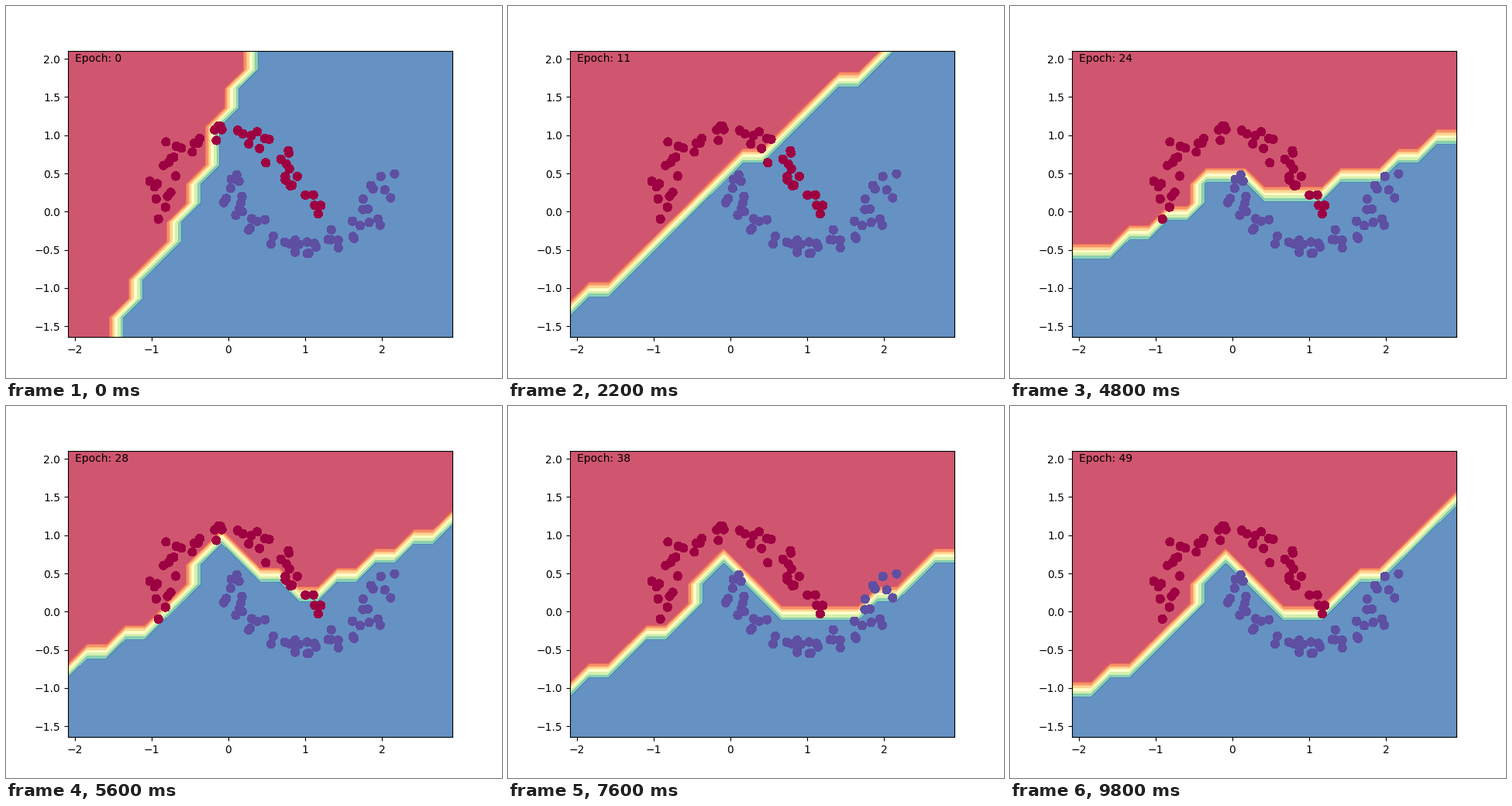
Write a matplotlib script that moves like this. It is 640 by 480 pixels and loops after 10000 ms.

```python
import numpy as np
import matplotlib.pyplot as plt
from matplotlib.animation import FuncAnimation

EPOCHS, STEP_MS = 50, 200
STEP = 0.25
COLS, ROWS = np.arange(21), np.arange(16)
XS, YS = -2.0865 + STEP * COLS, -1.6424 + STEP * ROWS


def make_moons(n=100, noise=0.1, seed=1337):
    """Two interleaved half circles, shuffled and jittered."""
    rng = np.random.RandomState(seed)
    t = np.linspace(0, np.pi, n // 2)
    upper = np.column_stack([np.cos(t), np.sin(t)])
    lower = np.column_stack([1 - np.cos(t), 0.5 - np.sin(t)])
    points = np.vstack([upper, lower])
    classes = np.repeat([0, 1], n // 2)
    order = np.arange(n)
    rng.shuffle(order)
    return points[order] + rng.normal(scale=noise, size=(n, 2)), classes[order]


def curve(*pts):
    """Boundary height, in grid rows, at every grid column."""
    return np.interp(COLS, *zip(*pts))


# The boundary swings down, flattens, then wraps around the lower moon
PEAK = [(7, 9), (8, 10), (11, 7)]
KEYS = {
    0: curve((0, -4.5), (3, 1.7), (7, 9), (20, 41.6)),
    6: curve((0, 0.2), (20, 19)),
    11: curve((0, 2.3), (2, 3.3), (9, 9.6), (20, 18.4)),
    19: curve((0, 5.05), (9, 7.55), (20, 10)),
    28: curve((0, 4.2), (6, 7.6), (7, 10), (8, 11), (10, 9), (13, 8.1),
              (20, 11.9)),
    33: curve((0, 2.6), (6, 6.9), (7, 9), (8, 10.2), (10, 9.2), (12, 9.2),
              (20, 15)),
    38: curve((0, 3.1), (6, 6.9), *PEAK, (15, 7.2), (20, 10.3)),
    49: curve((0, 2.7), (3, 4.4), (6, 7), *PEAK, (13, 7), (16, 9.4),
              (20, 13)),
}
TIMES = list(KEYS)
TRACKS = np.transpose(list(KEYS.values()))


def predict(epoch):
    """Class of each grid node: 1 below the boundary, 0 above it."""
    height = np.array([np.interp(epoch, TIMES, track) for track in TRACKS])
    return (ROWS[:, None] < np.floor(height + 0.5)).astype(float)


fig, ax = plt.subplots(figsize=(6.4, 4.8), dpi=100)
ax.set_xlim(XS[0], XS[-1])
ax.set_ylim(YS[0], YS[-1])

points, classes = make_moons()
ax.scatter(*points.T, c=classes, s=49, cmap="Spectral", antialiased=False,
           zorder=2)
label = ax.text(-2, 2, "", va="center")
regions = []


def draw(epoch):
    while regions:
        regions.pop().remove()
    regions.append(ax.contourf(XS, YS, predict(epoch), cmap="Spectral",
                               alpha=0.8, zorder=0))
    label.set_text(f"Epoch: {epoch}")
    return regions + [label]


anim = FuncAnimation(fig, draw, frames=EPOCHS, interval=STEP_MS)
plt.show()
```
